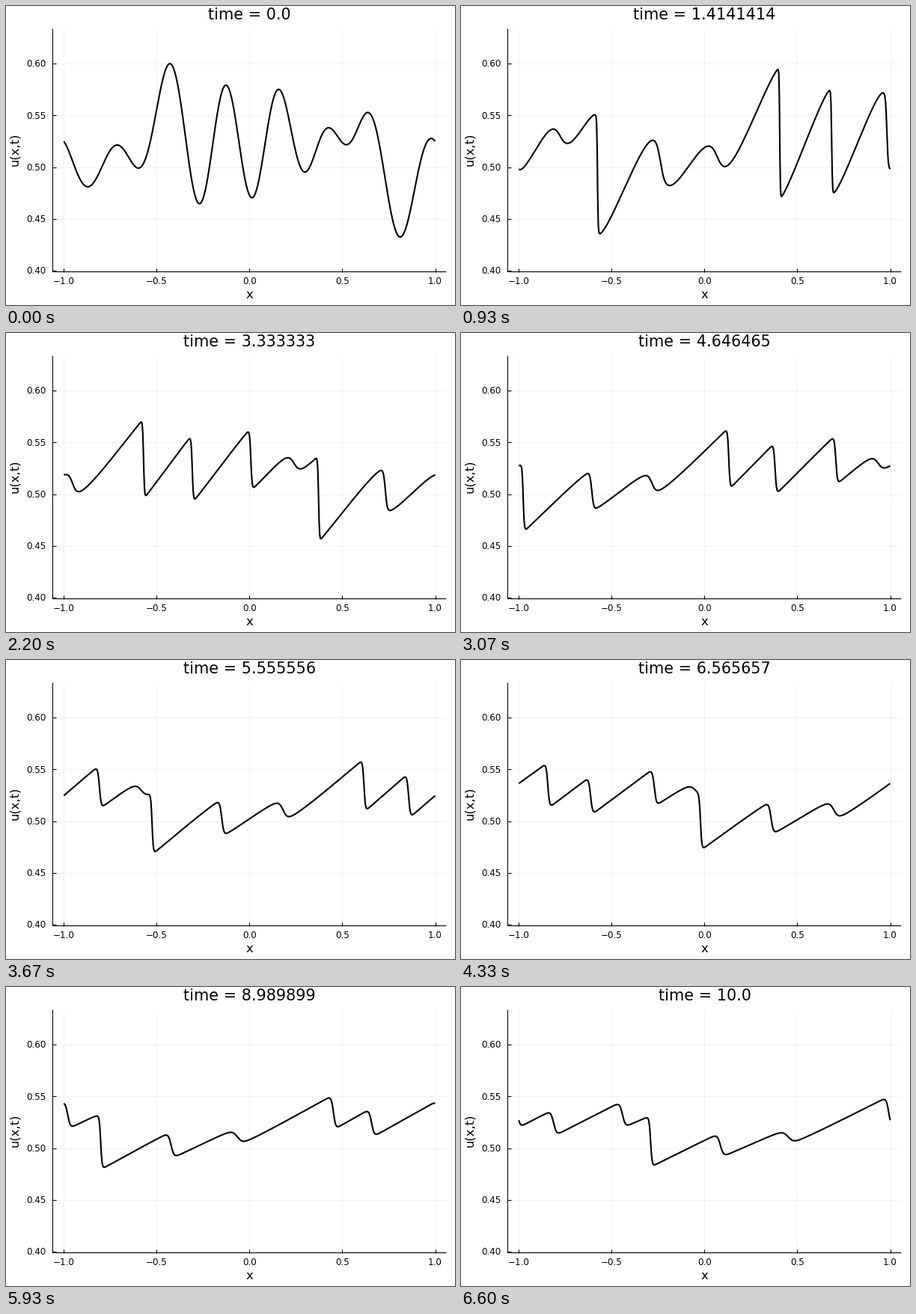
These frames come from a looping animation (600x400 px, 6670 ms). A matplotlib script:

```python
import numpy as np
import matplotlib.pyplot as plt
from matplotlib.animation import FuncAnimation

W, H, DPI = 600, 400, 100
PT = 72 / DPI  # points per pixel
STEPS, LOOP_MS, TICK_MS, T_END = 100, 6670, 10, 10.0
TICKS = LOOP_MS // TICK_MS
RATE = 15  # time steps shown per second
NU = 1e-4
MODES = np.arange(1, 11)

# Turning points (x, u) of the initial wave
TURNS = np.array([
    (-0.8705, 0.4810), (-0.7130, 0.5213), (-0.5980, 0.4990), (-0.4290, 0.5998),
    (-0.2695, 0.4646), (-0.1265, 0.5791), (0.0125, 0.4704), (0.1575, 0.5750),
    (0.2985, 0.4952), (0.4255, 0.5380), (0.5220, 0.5216), (0.6370, 0.5527),
    (0.8120, 0.4325), (0.9810, 0.5277)])
EDGE = (1.0, 0.5248)


def basis(x):
    """Periodic basis on [-1, 1], its derivative and its integral."""
    k = np.pi * MODES
    c, s = np.cos(np.outer(x, k)), np.sin(np.outer(x, k))
    one, zero = np.ones((len(x), 1)), np.zeros((len(x), 1))
    return (np.hstack([one, c, s]),
            np.hstack([zero, -k * s, k * c]),
            np.hstack([zero, s / k, -c / k]))


def fit_wave():
    """Smooth periodic wave through the turning points."""
    pts = np.vstack([TURNS, EDGE])
    values = basis(pts[:, 0])[0]
    slopes = 0.006 * basis(TURNS[:, 0])[1]
    damp = 0.01 * (MODES / 8) ** 8
    ridge = np.diag(np.r_[0, damp, damp])
    rhs = np.r_[pts[:, 1], np.zeros(len(slopes) + len(ridge))]
    return np.linalg.lstsq(np.vstack([values, slopes, ridge]), rhs, rcond=None)[0]


coef = fit_wave()
mean = coef[0]
x = np.linspace(-1, 1, 641)
table_x = np.linspace(-1, 1, 4097)
potential = basis(table_x)[2] @ coef


def burgers(t):
    """Cole-Hopf solution of u_t + u u_x = NU u_xx."""
    if t == 0:
        return basis(x)[0] @ coef
    reach = 0.13 + 8 * np.sqrt(2 * NU / t)
    v = np.linspace(-reach, reach, 451)
    y = (x - mean * t)[:, None] - t * v
    y = (y + 1) % 2 - 1
    g = -(t * v ** 2 / 2 + np.interp(y, table_x, potential)) / (2 * NU)
    w = np.exp(g - g.max(axis=1, keepdims=True))
    return mean + w @ v / w.sum(axis=1)


times = T_END * np.arange(STEPS) / (STEPS - 1)
waves = [burgers(t) for t in times]

plt.rcParams["font.family"] = "DejaVu Sans"
fig = plt.figure(figsize=(W / DPI, H / DPI), dpi=DPI, facecolor="white")

# Plot area in pixels, and the data scale
LEFT, RIGHT, TOP, BOTTOM = 62.4, 588.3, 30.5, 355.6
X0, SX = 325.4, 248.1
Y0, SY = 215.5, 1386.0


def px(value):
    return X0 + SX * value


def py(value):
    return Y0 - SY * (value - 0.5)


def label(cx, base, text, size, ha="center", **kw):
    return fig.text(cx / W, 1 - base / H, text, fontsize=size * PT,
                    ha=ha, va="baseline", color="black", **kw)


ax = fig.add_axes([0, 0, 1, 1])
ax.set(xlim=(0, W), ylim=(H, 0), autoscale_on=False)
ax.axis("off")


def stroke(xs, ys, width):
    return ax.plot(xs, ys, color="black", lw=width * PT, snap=False,
                   solid_joinstyle="round", solid_capstyle="butt")[0]


grid = dict(color="black", lw=0.75 * PT, alpha=0.07)
mark = dict(color="black", lw=1.1 * PT)
x_ticks = np.linspace(-1, 1, 5)
y_ticks = np.linspace(0.4, 0.6, 5)

ax.vlines(px(x_ticks), TOP, BOTTOM, **grid)
ax.hlines(py(y_ticks), LEFT, RIGHT, **grid)
ax.vlines(px(x_ticks), BOTTOM - 5, BOTTOM, **mark)
ax.hlines(py(y_ticks), LEFT, LEFT + 5, **mark)
stroke([LEFT, LEFT, RIGHT], [TOP, BOTTOM, BOTTOM], 1.1)

for value in x_ticks:
    label(px(value), 371.8, f"{value:.1f}".replace("-", "\u2212"), 11.9)
for value in y_ticks:
    label(53.9, py(value) + 4.35, f"{value:.2f}", 11.9, ha="right")
label(X0, 391.4, "x", 16.4)
label(16, 192.2, "u(x,t)", 16.4, rotation=90, rotation_mode="anchor")

title = label(325.5, 18.5, "", 20.8)
curve = stroke([], [], 2.1)


def draw(tick):
    step = int((tick + 0.5) * TICK_MS * RATE / 1000)
    t = float(times[step])
    title.set_text(f"time = {round(t, 7 if t < 2 else 6)}")
    curve.set_data(px(x), py(waves[step]))
    return title, curve


anim = FuncAnimation(fig, draw, frames=TICKS, interval=TICK_MS,
                     repeat=True, repeat_delay=0)
plt.show()
```
